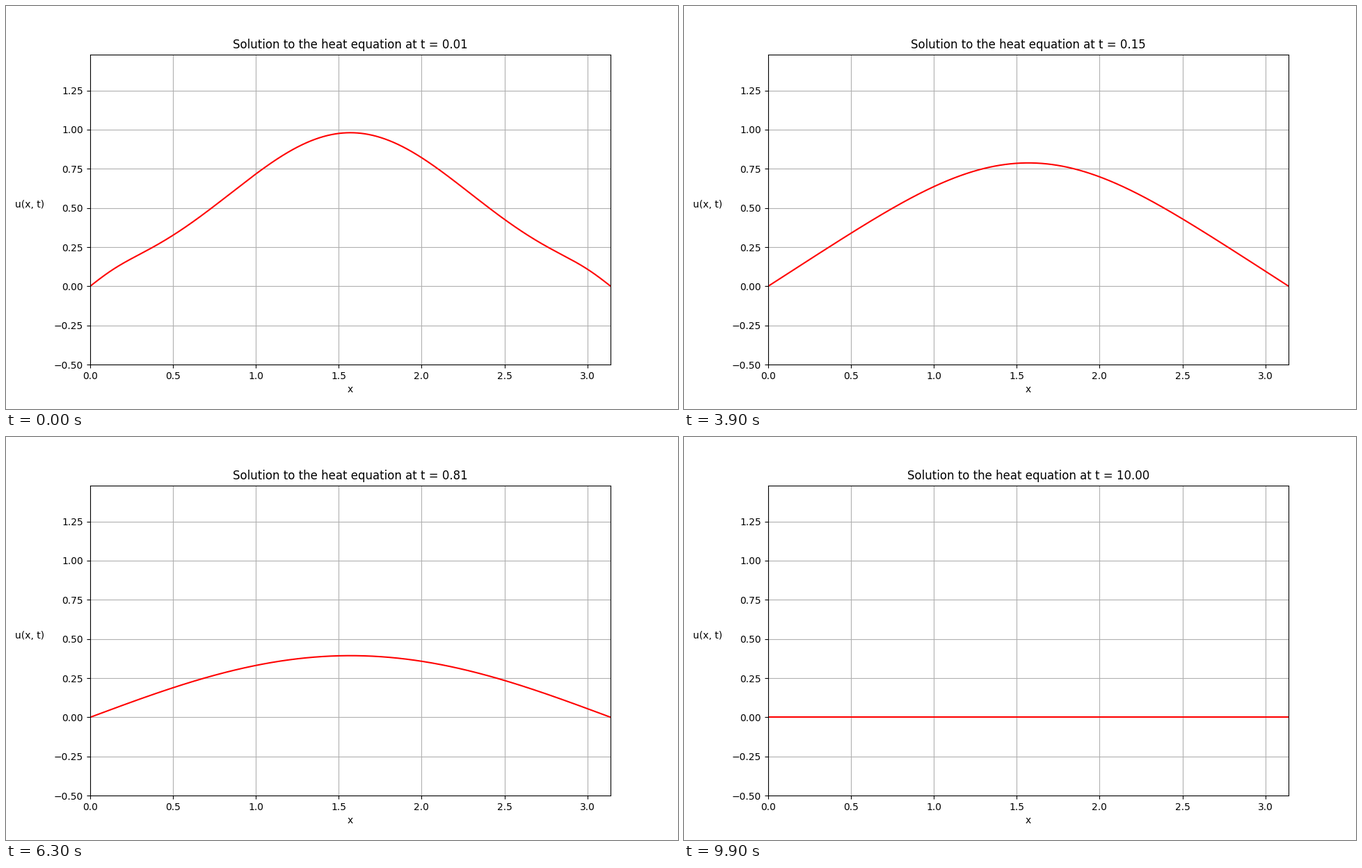
Recreate the animation shown at these times as a matplotlib script. Size 966 px wide and 580 px high, loop 10000 ms.

```python
import numpy as np
import matplotlib.pyplot as plt
from matplotlib.animation import FuncAnimation

FRAMES = 100
TERMS = 60

x = np.linspace(0, np.pi, 1000)
times = np.logspace(-2, 1, FRAMES)

# Sine series of a Gaussian bump centred on the rod
n = np.arange(1, TERMS + 1)
modes = np.sin(np.outer(n, x))
bump = np.exp(-(x - np.pi / 2) ** 2)
coeffs = 2 / np.pi * np.trapezoid(modes * bump, x, axis=1) \
    if hasattr(np, "trapezoid") else 2 / np.pi * np.trapz(modes * bump, x, axis=1)


def u(t):
    return (coeffs * np.exp(-n ** 2 * t)) @ modes


start = u(times[0])

fig, ax = plt.subplots(figsize=(9.66, 5.8), dpi=100)
line, = ax.plot(x, start, color="red")
ax.set_xlim(0, np.pi)
ax.set_ylim(-0.5, start.max() + 0.5)
ax.set_xlabel("x")
ax.set_ylabel("u(x, t)", rotation=0, labelpad=25)
ax.grid(True)
title = ax.set_title("")


def update(i):
    t = times[i]
    line.set_ydata(u(t))
    title.set_text(f"Solution to the heat equation at t = {t:.2f}")
    return line, title


anim = FuncAnimation(fig, update, frames=FRAMES, interval=100,
                     repeat=True, repeat_delay=0, blit=False)
plt.show()
```
